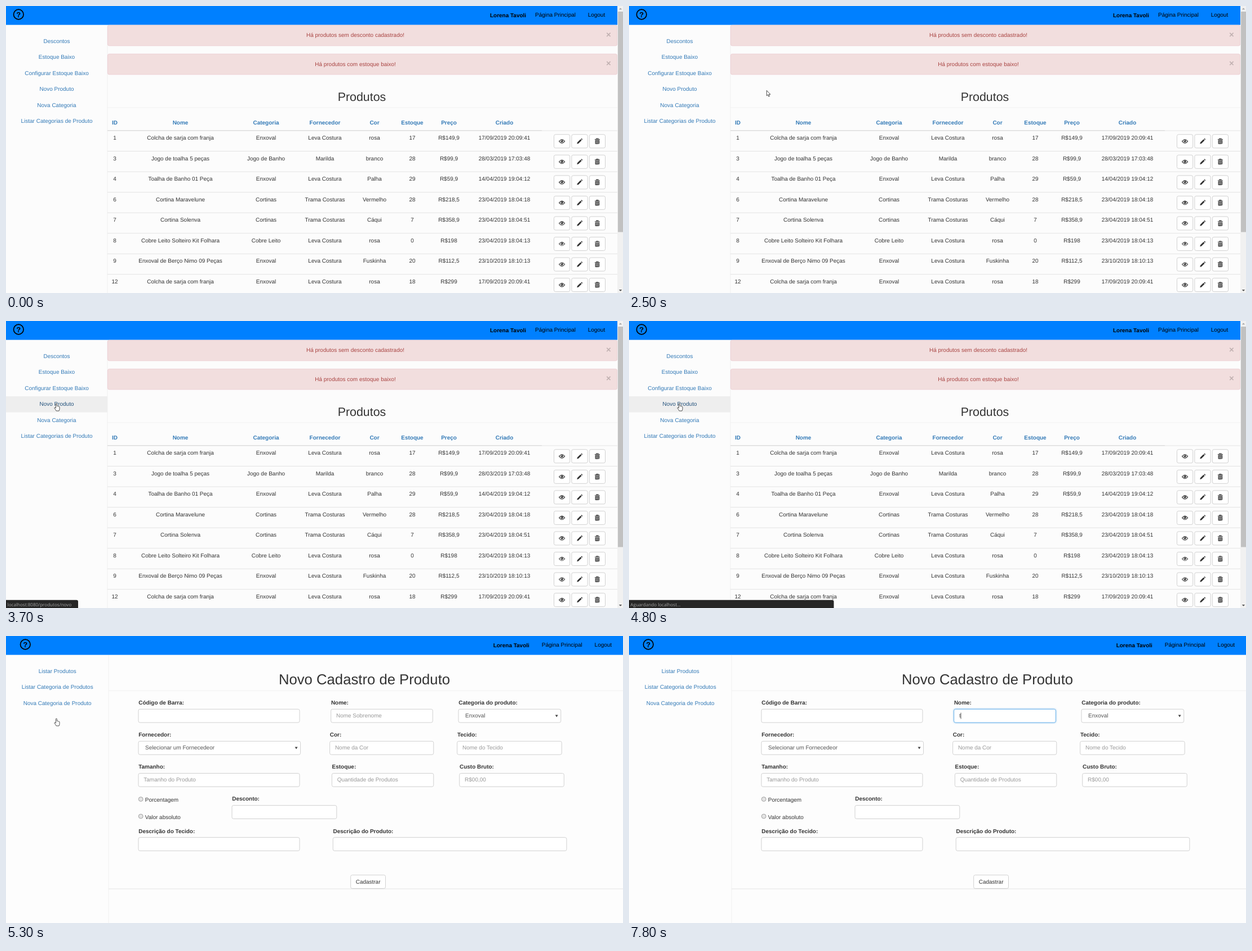
Write an HTML page that moves like this. It is 1095x511 px and loops after 8 s.

```html
<!DOCTYPE html>
<html lang="pt-BR">
<head>
<meta charset="utf-8">
<title>Produtos</title>
<style>
html, body { margin: 0; width: 100%; height: 100%; overflow: hidden; background: #fcfcfc; }
svg { display: block; font: 9.98px "Liberation Sans", Arial, sans-serif; text-rendering: geometricPrecision; }
.b { font-weight: bold; }
.link { fill: #337ab7; }
.box { fill: #fff; stroke: #ccc; stroke-width: .9; }
.bar { font: 8.1px "Open Sans", "Noto Sans", sans-serif; }
</style>
</head>
<body>
<svg id="stage" width="1095" height="511" viewBox="0 0 1095 511"></svg>
<script>
const text = (x, y, s, attrs = '') => `<text x="${x}" y="${y}" fill="#333" ${attrs}>${s}</text>`;
const mid = (x, y, s, attrs = '') => text(x, y, s, 'text-anchor="middle" ' + attrs);
const rect = (x, y, w, h, attrs = '') => `<rect x="${x}" y="${y}" width="${w}" height="${h}" ${attrs}/>`;
const line = (x1, x2, y, color, w = .8) =>
  `<path d="M${x1} ${y}H${x2}" stroke="${color}" stroke-width="${w}"/>`;
const link = 'class="link"', bold = 'class="b"';

function frame(dx, nameX, pageX, outX, sideX, links, edge) {
  return rect(0, 0, 1095, 33.6, 'fill="#0080ff"') +
    `<circle cx="${22.3 + dx}" cy="15" r="8.8" fill="none" stroke="#000" stroke-width="1.7"/>` +
    mid(22.3 + dx, 19.7, '?', 'style="font-size:13px;font-weight:bold;fill:#000"') +
    text(nameX, 20, 'Lorena Tavoli', 'style="font-weight:bold;fill:#000"') +
    text(pageX, 18.8, 'Página Principal', 'style="fill:#000"') +
    text(outX, 18.8, 'Logout', 'style="fill:#000"') +
    `<path d="M${edge} 34V511" stroke="#eee" stroke-width=".8"/>` +
    '<g id="hover' + edge + '"></g>' +
    links.map((s, i) => mid(sideX, 65.6 + 28.55 * i, s, link)).join('');
}

const icons = `<defs>
<g id="eye"><path d="M-5 0Q0-6.6 5 0Q0 6.6-5 0Z" fill="none" stroke="#333" stroke-width="1.1"/><circle cy="-.4" r="2.2" fill="#333"/><circle cx="-.7" cy="-1" r=".7" fill="#fff"/></g>
<path id="pencil" fill="#333" d="M-4.7 4.7L-4 2L1.6-3.6L3.6-1.6L-2 4ZM2.3-4.3L3.2-5.1Q5.2-4.6 5.1-3.2L4.3-2.3Z"/>
<g id="trash"><path d="M-4.5-3.2H4.5M-1.6-3.6V-4.8H1.6V-3.6" fill="none" stroke="#333" stroke-width="1.1"/><path d="M-3.8-1.8H3.8V4Q3.8 5-2.8 5H-2.8Q-3.8 5-3.8 4Z" fill="#333"/><path d="M-2-1V4M0-1V4M2-1V4" stroke="#fff" stroke-width=".7"/></g>
</defs>`;

const alertBox = (y, s) =>
  rect(180.4, y, 904.2, 36.6, 'rx="2.8" fill="#f2dede" stroke="#ebccd1" stroke-width=".8"') +
  mid(620, y + 21.1, s, 'style="fill:#a94442"') +
  mid(1069.3, y + 21.4, '×', 'style="font-size:15px;font-weight:bold;fill:#000;opacity:.2"');

const cols = [193, 309.5, 461.5, 566, 654, 721, 786, 884.5];
const heads = ['ID', 'Nome', 'Categoria', 'Fornecedor', 'Cor', 'Estoque', 'Preço', 'Criado'];
const rows = `1|Colcha de sarja com franja|Enxoval|Leva Costura|rosa|17|R$149,9|17/09/2019 20:09:41
3|Jogo de toalha 5 peças|Jogo de Banho|Marilda|branco|28|R$99,9|28/03/2019 17:03:48
4|Toalha de Banho 01 Peça|Enxoval|Leva Costura|Palha|29|R$59,9|14/04/2019 19:04:12
6|Cortina Maravelune|Cortinas|Trama Costuras|Vermelho|28|R$218,5|23/04/2019 18:04:18
7|Cortina Solenva|Cortinas|Trama Costuras|Cáqui|7|R$358,9|23/04/2019 18:04:51
8|Cobre Leito Solteiro Kit Folhara|Cobre Leito|Leva Costura|rosa|0|R$198|23/04/2019 18:04:13
9|Enxoval de Berço Nimo 09 Peças|Enxoval|Leva Costura|Fuskinha|20|R$112,5|23/10/2019 18:10:13
12|Colcha de sarja com franja|Enxoval|Leva Costura|rosa|18|R$299|17/09/2019 20:09:41`
  .split('\n').map(r => r.split('|'));

const row = (cells, i) => {
  const y = 36.54 * i;
  return line(180, 1085, 222 + y, '#ddd') +
    cells.map((s, c) => mid(cols[c], 238.2 + y, s)).join('') +
    ['eye', 'pencil', 'trash'].map((id, k) =>
      rect(972.5 + 31.4 * k, 228.8 + y, 28.2, 24, 'class="box" rx="2.8"') +
      `<use href="#${id}" x="${986.6 + 31.4 * k}" y="${240.8 + y}"/>`).join('');
};

const listPage = rect(0, 0, 1095, 511, 'fill="#fcfcfc"') +
  frame(0, 859, 939, 1032.7, 90, ['Descontos', 'Estoque Baixo', 'Configurar Estoque Baixo',
    'Novo Produto', 'Nova Categoria', 'Listar Categorias de Produto'], 180) +
  alertBox(34.2, 'Há produtos sem desconto cadastrado!') +
  alertBox(85.4, 'Há produtos com estoque baixo!') +
  mid(631.5, 169.4, 'Produtos', 'font-size="21.4"') +
  line(180, 1085, 181, '#eee') +
  heads.map((s, c) => mid(cols[c], 211.2, s, 'class="b link"')).join('') +
  rows.map(row).join('') + line(180, 951, 221.6, '#ddd', 1.4) +
  rect(1085, 0, 10, 511, 'fill="#f1f1f1"') + rect(1086, 10, 9, 392.5, 'fill="#c1c1c1"') +
  '<path d="M1087.8 6.2H1093.2L1090.5 3.5Z" fill="#a3a3a3"/><path d="M1087.8 505H1093.2L1090.5 507.8Z" fill="#505050"/>';

function field(x, w, r, label, hint = '', select = false) {
  const y = 130.3 + 57.1 * r;
  return text(x + .2, y - 8.2, label, bold) +
    rect(x, y, w, 23.8, `class="box" rx="2.8" ${label == 'Nome:' ? 'id="nome"' : ''}`) +
    text(x + (select ? 12 : 9.3), y + 14.9, hint,
      `style="fill:${select ? '#555' : '#999'}" ${label == 'Nome:' ? 'id="hint"' : ''}`) +
    (select ? `<path d="M${x + w - 10} ${y + 10.2}h5l-2.5 4Z" fill="#444"/>` : '');
}
const radio = (y, s) =>
  `<circle cx="239.2" cy="${y}" r="3.9" fill="#e4e4e4" stroke="#999" stroke-width=".9"/>` + text(246.8, y + 4.6, s);

const formPage = rect(0, 0, 1095, 511, 'fill="#fdfdfd"') +
  frame(12, 864.7, 950.8, 1044.6, 91.2,
    ['Listar Produtos', 'Listar Categoria de Produtos', 'Nova Categoria de Produto'], 182) +
  mid(636, 85.9, 'Novo Cadastro de Produto', 'font-size="25.7"') +
  line(182, 1095, 97.4, '#eee') +
  field(235, 286, 0, 'Código de Barra:') +
  field(576.7, 180.6, 0, 'Nome:', 'Nome Sobrenome') +
  field(803, 181.7, 0, 'Categoria do produto:', 'Enxoval', true) +
  field(235, 287.6, 1, 'Fornecedor:', 'Selecionar um Fornecedeor', true) +
  field(574.6, 184.2, 1, 'Cor:', 'Nome da Cor') +
  field(800.7, 185.5, 1, 'Tecido:', 'Nome do Tecido') +
  field(235, 286, 2, 'Tamanho:', 'Tamanho do Produto') +
  field(578.4, 180.4, 2, 'Estoque:', 'Quantidade de Produtos') +
  field(804.8, 185.5, 2, 'Custo Bruto:', 'R$00,00') +
  radio(290.5, 'Porcentagem') + radio(321, 'Valor absoluto') +
  field(401, 185.8, 3, 'Desconto:') +
  field(235, 286, 4, 'Descrição do Tecido:') +
  field(580.3, 414.6, 4, 'Descrição do Produto:') +
  line(182, 1095, 450.2, '#ddd') +
  rect(611.7, 425.6, 61.8, 24, 'class="box" rx="2.8"') +
  mid(642.6, 440.8, 'Cadastrar') +
  text(586, 145.2, 't', 'id="typed" style="fill:#555"') +
  rect(586, 136.6, .8, 11, 'id="caret" fill="#333"');

const $ = id => document.getElementById(id);
$('stage').innerHTML = icons + `<g id="list">${listPage}</g><g id="form">${formPage}</g>
<g id="status"><path id="bubble" fill="#262626"/>${text(2.6, 507.6, '', 'id="msg" class="bar" style="fill:#a4a4a4"')}</g>
<g id="cursor" fill="#fff" stroke="#222" stroke-width=".8" stroke-linejoin="round">
<path id="arrow" d="M.3.4V9.8L2.4 7.9L3.9 11.3L5.4 10.6L4 7.3H6.9Z"/>
<path id="hand" d="M-1.6 8.2V1.2Q-1.6 0-.6 0T.5 1.2V4.6Q1.5 3.9 2.2 4.9Q3.3 4.4 3.8 5.3Q5 5 5 6.4V9.5Q5 11 4 13H-.8Q-1.6 11-4 8.4Q-4.4 7.2-3.2 7Q-2.4 7.1-1.6 8.2Z"/></g>`;
$('hover180').innerHTML = rect(0, 134, 180, 28.5, 'fill="#eee"');
const newLink = [...document.querySelectorAll('#list .link')].find(e => e.textContent == 'Novo Produto');

// time, x, y of the pointer
const path = [[900, 287, 21], [1100, 428, 145], [1300, 428, 145], [1500, 502, 177], [1600, 502, 177],
  [1800, 501.4, 176.6], [2000, 501.4, 176.6], [2500, 244, 150], [2600, 244, 150], [3300, 90, 147],
  [6100, 90, 147], [6500, 242.5, 154], [6600, 242.5, 154]];

function pointer(t) {
  const i = Math.max(1, path.findIndex(p => p[0] >= t));
  const [t0, x0, y0] = path[i - 1], [t1, x1, y1] = path[i];
  const u = (t - t0) / (t1 - t0), k = u * u * (3 - 2 * u);
  return [x0 + (x1 - x0) * k, y0 + (y1 - y0) * k];
}
const show = (id, on) => $(id).style.display = on ? '' : 'none';

function draw(now) {
  const t = Math.floor(now % 8000 / 100) * 100; // the screen updates ten times a second
  const onForm = t >= 4900, moving = t >= 900 && t < 6600;
  show('list', !onForm);
  show('form', onForm);

  show('cursor', moving);
  let hand = false;
  if (moving) {
    const [x, y] = pointer(t);
    hand = t > 2600 && t < 6200 && x < 180;
    $('cursor').setAttribute('transform', `translate(${x} ${y})`);
  }
  show('hand', hand);
  show('arrow', !hand);
  show('hover180', hand);
  newLink.style.fill = hand ? '#23527c' : '';

  const waiting = t >= 4800, w = waiting ? 363.5 : 128;
  show('status', t >= 3600 && t < 5300);
  $('status').style.opacity = t == 3600 || t == 5200 ? .5 : 1;
  $('bubble').setAttribute('d', `M0 496.8H${w - 3}q3 0 3 3V511H0Z`);
  $('msg').textContent = waiting ? 'Aguardando localhost...' : 'localhost:8080/produtos/novo';

  const focus = t >= 7200, typed = t >= 7800;
  $('nome').style.cssText = focus
    ? `stroke:${t == 7200 ? '#99bedb' : '#66afe9'};filter:drop-shadow(0 0 1.6px rgba(102,175,233,${t == 7200 ? .4 : .8}))` : '';
  show('hint', !typed);
  show('typed', typed);
  show('caret', focus && t != 7700);
  $('caret').setAttribute('x', typed ? 588.6 : 586);
  requestAnimationFrame(draw);
}
const start = performance.now();
requestAnimationFrame(() => draw(performance.now() - start));
draw = (step => () => step(performance.now() - start))(draw);
</script>
</body>
</html>
```
